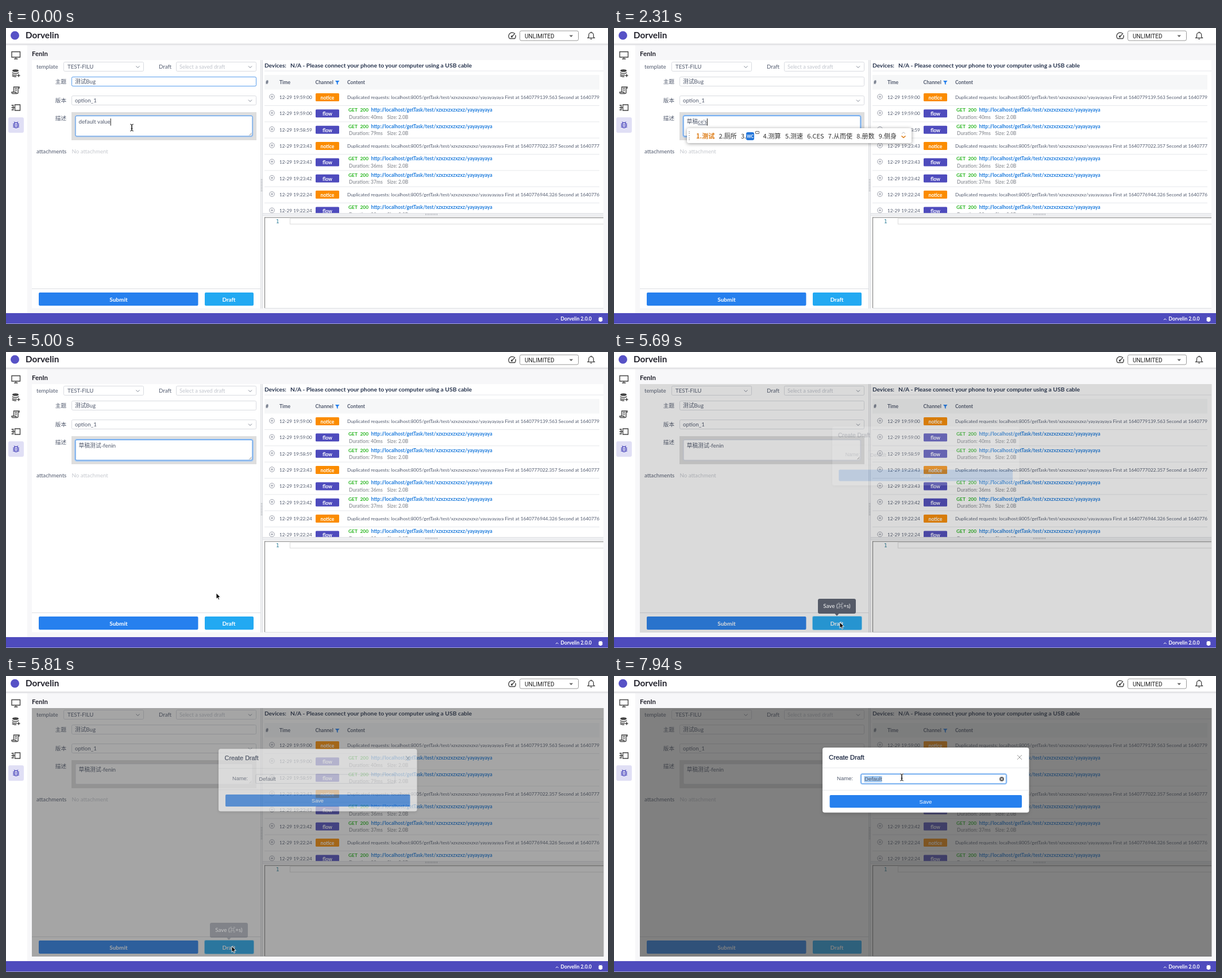
Animation of 1048 by 517 pixels, one loop 8000 ms. Source, as an HTML page:

```html
<!DOCTYPE html>
<html lang="zh">
<head>
<meta charset="utf-8">
<title>Create draft</title>
<style>
  html, body { margin: 0; width: 100%; height: 100%; overflow: hidden; background: #f7f7f9; }
  svg { position: absolute; left: 0; top: 0; display: block; }
  svg text { font-family: Lato, "Noto Sans CJK SC", "Noto Sans CJK", "DejaVu Sans", sans-serif; white-space: pre; }
  svg text.ui { font-family: "Liberation Sans", Arial, sans-serif; }
  svg text.rb { font-family: Roboto, sans-serif; }
  #comp { text-decoration: underline; }
  #ime {
    position: absolute; top: 175px; height: 26px; width: 391px; box-sizing: border-box;
    padding-left: 16px; display: flex; align-items: center; gap: 7.3px; white-space: nowrap;
    background: #fff; border-radius: 3px; box-shadow: 0 1px 6px rgba(0,0,0,.4);
    font: 500 11px "Noto Sans CJK SC", "Noto Sans CJK", sans-serif; color: #333;
  }
  #ime .first { color: #dd7a12; font-weight: 700; }
  #ime .grip { position: absolute; left: 3px; top: 5px; bottom: 5px; border-left: 2px dotted #ccc; }
  #ime .wc { display: inline-block; width: 14px; height: 14px; margin-right: 8px; border-radius: 3px;
    background: #2476da; color: #fff; font: 700 7px/14px Lato, sans-serif; text-align: center; vertical-align: 1px; position: relative; }
  #ime .wc::after { content: ""; position: absolute; left: 16px; top: -2px; width: 5px; height: 3px; border: 1px solid #666; border-radius: 1px; }
  #ime svg { left: 371px; top: 5px; }
</style>
</head>
<body>
<svg id="stage" width="1048" height="517" viewBox="0 0 1048 517"></svg>
<div id="ime"></div>
<script>
const LOOP = 8000, STEP = 62.5;
const VIOLET = '#4e4bbd', BLUE = '#2680ee', INK = '#515a6e', DARK = '#26334d';

// Markup helpers; text is centred vertically on y.
const text = (x, y, size, str, fill = INK, extra = '') =>
  `<text x="${x}" y="${y + size * .35}" font-size="${size}" fill="${fill}" ${extra}>${str}</text>`;
const rect = (x, y, w, h, fill, extra = '') =>
  `<rect x="${x}" y="${y}" width="${w}" height="${h}" fill="${fill}" ${extra}/>`;
const path = (d, stroke, width = 1, extra = '') =>
  `<path d="${d}" fill="none" stroke="${stroke}" stroke-width="${width}" ${extra}/>`;
const box = (x, y, w, h, extra = '') => rect(x, y, w, h, '#fff', `rx="2" stroke="#d9dbe0" ${extra}`);
const chevron = (x, y) => path(`M${x - 3} ${y - 1.5}l3 3l3 -3`, '#7b8290');
const BOLD = ' font-weight="700"', MID = 'text-anchor="middle"', END = 'text-anchor="end"';

function bug(x, y, s, color) {
  return `<g transform="translate(${x} ${y}) scale(${s})">` +
    path('M-3 -1.5a3 3 0 0 1 6 0v3.5a3 3 0 0 1 -6 0zM-2 -4l-1.5 -1.8M2 -4l1.5 -1.8' +
      'M-3 -2h-2.6M3 -2h2.6M-3 .8h-2.6M3 .8h2.6M-3 3.4h-2.6M3 3.4h2.6M-1.2 -.8h2.4M-1.2 1.8h2.4', color, 1.3) + '</g>';
}

function header() {
  return rect(0, 0, 1048, 28, '#fff') +
    ['#d0d0d4', '#dedee1', '#ededf0'].map((c, i) => rect(0, 27.5 + i, 1048, 1, c)).join('') +
    '<circle cx="15.5" cy="13" r="7.5" fill="#5752c6"/>' +
    text(34, 12.5, 15.3, 'Dorvelin', '#22222c', BOLD) +
    path('M876.5 18.5a6 6 0 1 1 9.6 -8.2M887 12.5a6 6 0 0 1 -1.4 6h-9M880 15.5l5.8 -5.5', '#444', 1.4) +
    '<circle cx="880.5" cy="15" r="1.7" fill="#444"/>' +
    rect(894.5, 5, 102, 17, '#fff', 'rx="2.5" stroke="#999"') +
    text(903, 14, 10.1, 'UNLIMITED', '#222', 'class="rb"') +
    '<path d="M980.5 12.5h6.6l-3.3 3.6z" fill="#666"/>' +
    path('M1012.8 17.3h11.6l-1.7 -2v-3.2a4.1 4.1 0 0 0 -8.2 0v3.2zM1017.2 19.4h2.8M1018.6 8v-1.5', '#444', 1.3);
}

function sidebar() {
  const c = '#444';
  return rect(0, 30.5, 37, 467.5, '#fff') + rect(4, 156, 27, 27, '#e0dff5', 'rx="3"') +
    path('M10 41.5h14.5v9.5h-14.5zM14 54h6.5M17.2 51v3', c, 1.4) +
    '<ellipse cx="16.5" cy="74.5" rx="5.5" ry="2.3" fill="#444"/>' +
    path('M11 77.5c1 2.6 10 2.6 11 0M11 80.5c.8 2.3 6 2.4 8 1.6M11 83c.8 2 5 2.2 7 1.8M19.5 83h5M22 80.5v5', c, 1.5) +
    path('M13.5 112v-9h9.5v2h-2v7.5a2 2 0 0 1 -2 2h-7.5a2 2 0 0 1 -1.5 -2.5h7.5v1.8M15.5 105.5h3.5M15.5 108.5h3.5', c, 1.4) +
    path('M15.5 134h9v10h-9zM12.5 134v10M9.5 135h3M9.5 139h6M9.5 143h3', c, 1.4) +
    bug(17.5, 169.5, .98, VIOLET);
}

function form() {
  const field = (x, y, str, fill) => text(x, y, 9.7, str, fill);
  return rect(45, 56, 398, 433.5, '#fff') +
    field(53, 68, 'template') + box(100.5, 59.5, 139, 16) + field(107, 68, 'TEST-FILU') + chevron(229.5, 68) +
    field(266, 68, 'Draft') + box(296.5, 59.5, 139, 16) + text(302, 68, 9.3, 'Select a saved draft', '#c0c4cc') + chevron(425, 68) +
    text(105, 94, 9.6, '主题', INK, END) + box(114.5, 85.5, 321, 16) + field(120, 94, '测试Bug') +
    '<rect id="subject" x="114.5" y="85.5" width="321" height="16" rx="2" fill="none" stroke="#5a9fee"/>' +
    text(105, 126.5, 9.6, '版本', INK, END) + box(114.5, 118.5, 321, 16) + field(120, 127, 'option_1') + chevron(425, 127) +
    text(105, 158, 9.6, '描述', INK, END) + rect(114, 147, 322, 49, '#dedede') +
    '<rect id="glow" x="120.5" y="153" width="309" height="37" rx="3" fill="none" stroke="#a9cbf4" stroke-width="3"/>' +
    box(121, 153.5, 308, 35.5) +
    '<rect id="areaEdge" x="121" y="153.5" width="308" height="35.5" rx="2" fill="none" stroke="#4492ec"/>' +
    path('M423.5 187.5l4 -4M426 187.5l1.5 -1.5', '#777', .8) +
    '<rect id="areaSel" x="126" y="157" height="14" fill="#a2c8ef"/>' +
    '<text id="area" x="126.5" y="167.4" font-size="9.8" fill="#515a6e"><tspan id="done"></tspan><tspan id="comp"></tspan></text>' +
    '<rect id="areaCaret" y="158" width="1" height="12.5" fill="#222"/>' +
    field(53, 216, 'attachments') + field(114.5, 216, 'No attachment', '#c5c8ce') +
    rect(45, 455, 398, 1, '#dcdee2') +
    rect(57, 462, 277.5, 23, BLUE, 'rx="2"') + text(196, 474, 10, 'Submit', '#fff', MID + BOLD) +
    '<rect id="draftRing" x="345" y="461" width="87" height="25" rx="3" fill="#9bdcfa"/>' +
    rect(346, 462, 85, 23, '#22a9f2', 'rx="2"') + text(388, 474, 10, 'Draft', '#fff', MID + BOLD);
}

function row(y, [time, info]) {
  const notice = info.includes('.');
  const head = rect(450, y + 14, 583, 1, '#e6e8ec') +
    `<circle cx="463" cy="${y - 1}" r="4.3" fill="none" stroke="#808695" stroke-width=".8"/>` +
    path(`M460.8 ${y - 1}h4.4M463 ${y - 3.2}v4.4`, '#808695', .8) +
    text(476, y, 8.2, '12-29 ' + time) +
    rect(539, y - 7, 41, 14, notice ? '#fb8c00' : VIOLET, 'rx="1.5"') +
    text(559.5, y + .8, 8.6, notice ? 'notice' : 'flow', '#fff', MID + BOLD);
  const route = '/getTask/test/xzxzxzxzxzxz/yayayayaya';
  if (notice) {
    return head + text(594, y, 8.24, `Duplicated requests: localhost:8005${route} First at ${info} Second at ${info.slice(0, 7)}`);
  }
  return head + text(596, y - 6, 8.4, 'GET', '#25b51d', BOLD) + text(616.5, y - 6, 8.4, '200', '#25b51d', BOLD) +
    text(635.5, y - 6, 8.6, 'http://localhost' + route, '#1f7ddd', BOLD) +
    text(597, y + 6.5, 8.5, `Duration: ${info}ms`, '#9a9da3', BOLD) + text(663.5, y + 6.5, 8.5, 'Size: 2.0B', '#9a9da3', BOLD);
}

function table() {
  const rows = [
    ['19:59:00', '1640779139.563'], ['19:59:00', '40'], ['19:58:59', '79'], ['19:23:43', '1640777022.357'],
    ['19:23:43', '36'], ['19:23:42', '37'], ['19:22:24', '1640776944.326'], ['19:22:24', '38']];
  const head = (x, s) => text(x, 95, 8.6, s, INK, BOLD);
  return rect(447, 56, 593, 268, '#fff') +
    text(450, 65.5, 10.1, 'Devices:', DARK, BOLD) + text(495, 65.5, 10.3, 'N/A - Please connect your phone to your computer using a USB cable', DARK, BOLD) +
    rect(450, 74.5, 590, 1, '#e6e8ec') + rect(450, 82, 583, 25.5, '#f6f7f8') +
    head(452, '#') + head(476, 'Time') + head(538.5, 'Channel') + head(594, 'Content') +
    '<path d="M573 92h7.5l-2.8 3.4v3.6l-1.9 -1v-2.6z" fill="#2680ee"/>' +
    `<g clip-path="url(#tableClip)">${rows.map((r, i) => row(121 + i * 28.35, r)).join('')}</g>`;
}

function panes() {
  const grip = (x, y, w, h) => path(h > w ? `M${x} ${y}v${h}` : `M${x} ${y}h${w}`, '#b5b8bd', 3, 'stroke-dasharray="1 1.5"');
  return rect(443, 56, 4, 434, '#f1f2f4') + rect(443, 56, 1, 434, '#dcdee2') + rect(446, 56, 1, 434, '#dcdee2') + grip(445, 264, 0, 21) +
    rect(447, 323.5, 593, 5, '#f1f2f4') + rect(447, 323.5, 593, 1, '#dcdee2') + rect(447, 327.5, 593, 1, '#dcdee2') + grip(730, 325.5, 21, 0) +
    rect(447, 328.5, 593, 161, '#fff') + rect(450, 330.5, 590, 1, '#777') + rect(450, 330.5, 1, 159, '#777') +
    rect(450, 489, 590, 1, '#dcdee2') + rect(494.5, 332.5, 548, 10, 'none', 'stroke="#e4e4e4" stroke-width="1.4" clip-path="url(#paneClip)"') +
    text(475.5, 337.5, 9, '1', '#237893', `${END} style="font-family:'DejaVu Sans Mono',monospace"`);
}

function footer() {
  return rect(0, 498, 1048, 19, VIOLET) + rect(0, 516, 1048, 1, '#a3a2d2') +
    path('M957 510l2.3 -2.3l2.3 2.3', '#fff') +
    text(965.5, 508, 8.6, 'Dorvelin 2.0.0', '#fff', BOLD) +
    '<rect x="1032" y="505" width="6" height="8" rx="3" fill="#fff"/>' + bug(1035, 508.5, .68, '#fff');
}

function modal() {
  return '<g id="modal">' + rect(363, 125, 359.5, 113.5, '#fff', 'rx="4" filter="url(#soft)"') +
    text(374, 142, 11.3, 'Create Draft', '#17233d', 'class="ui" stroke="#17233d" stroke-width=".25"') +
    path('M702 138l8 8M710 138l-8 8', '#999') +
    rect(363, 160, 359.5, 1, '#e8eaec') + rect(363, 199, 359.5, 1, '#e8eaec') +
    text(388, 179, 9.6, 'Name:', INK, 'class="ui"') +
    '<rect id="nameGlow" x="429.5" y="171" width="254" height="17.5" rx="3" fill="none" stroke="#b5d3f6" stroke-width="2.4"/>' +
    box(430.3, 171.5, 252.4, 16.4, 'id="nameBox"') +
    '<rect id="nameSel" x="435.5" y="174.5" width="31" height="11" fill="#a2c8ef"/>' +
    text(436, 180, 9.7, 'Default', INK, 'class="ui"') +
    '<rect id="nameCaret" x="467" y="174.5" width="1" height="11" fill="#222"/>' +
    '<g id="clear"><circle cx="675" cy="180" r="4" fill="#666"/>' + path('M673.4 178.4l3.2 3.2M676.6 178.4l-3.2 3.2', '#fff', .9) + '</g>' +
    rect(375.5, 208, 334.5, 22, BLUE, 'id="save" rx="2"') + text(542.5, 219.5, 9.6, 'Save', '#fff', MID + ' class="ui"') + '</g>';
}

function cursors() {
  const beam = 'M-2.8 -6q2.8 0 2.8 2v8q0 2 -2.8 2M2.8 -6q-2.8 0 -2.8 2v8q0 2 2.8 2M-1.4 1.6h2.8';
  const edge = 'stroke="#fff" stroke-width=".9"';
  return '<g id="cursor">' +
    `<g id="beam">${path(beam, '#fff', 2.2)}${path(beam, '#111', 1)}</g>` +
    `<path id="arrow" d="M0 0v10.3l2.3 -2.1l1.6 3.6l1.7 -.8l-1.6 -3.4h3.3z" fill="#000" ${edge}/>` +
    `<path id="hand" d="M-1 0q1.4 -1 2 .4v3.2q1.4 -.6 2 .4q1.3 -.6 1.9 .4q1.6 -.4 1.7 1l-.8 4.6v1.2h-4.8v-1.2l-3.6 -4q.4 -1.4 1.6 -.6z" fill="#fff" stroke="#111" stroke-width=".9"/></g>`;
}

document.getElementById('stage').innerHTML =
  '<defs><clipPath id="tableClip"><rect x="450" y="107" width="583.5" height="216.5"/></clipPath>' +
  '<clipPath id="paneClip"><rect x="447" y="328" width="593" height="162"/></clipPath>' +
  '<filter id="soft"><feDropShadow dx="0" dy="2" stdDeviation="3" flood-opacity=".18"/></filter></defs>' +
  rect(0, 0, 1048, 517, '#f7f7f9') + header() + sidebar() + text(45, 45.5, 11.3, 'FenIn', '#22222c', BOLD) +
  form() + table() + panes() + footer() +
  rect(45, 56, 995.5, 434, '#373737', 'id="mask"') +
  '<g id="tip"><path d="M358 431h60a3 3 0 0 1 3 3v20a3 3 0 0 1 -3 3h-26.500l-3.500 4l-3.500 -4h-26.500a3 3 0 0 1 -3 -3v-20a3 3 0 0 1 3 -3z" fill="#464c5b"/>' +
  text(388, 444, 9.8, 'Save (⌘+s)', '#fff', MID) + '</g>' + modal() + cursors();

const el = {};
document.querySelectorAll('[id]').forEach(n => el[n.id] = n);
const show = (n, on) => n.style.display = on ? '' : 'none';
const clamp = v => Math.min(1, Math.max(0, v));
const ramp = (t, from, to) => clamp((t - from) / (to - from));
const latest = (table, t) => table.filter(k => k[0] <= t).pop();

// time, committed text, text still being composed
const typing = [
  [0, 'default value', ''], [1250, '', 'c'], [1375, '', 'ca'], [1437, '', 'cao'], [1562, '', "cao'g"],
  [1687, '', "cao'ga"], [1750, '', "cao'gao"], [1937, '草稿', ''], [2062, '草稿', 'c'], [2187, '草稿', 'ce'],
  [2300, '草稿', "ce's"], [2437, '草稿', "ce'sh"], [2500, '草稿', "ce'shi"], [2750, '草稿测试', ''],
  [2937, '草稿测试-', ''], [3062, '草稿测试-f', ''], [3125, '草稿测试-fe', ''], [3250, '草稿测试-fen', ''],
  [3312, '草稿测试-feni', ''], [3400, '草稿测试-fenin', '']];

const choices = {
  c: '才 从 次 层 草 错 曾 测 此', ca: '擦 嚓 才 菜 参 藏 草 策 惨', cao: '草 操 曹 槽 糙 嘈 漕 艹 螬',
  "cao'g": '草稿 草根 草果 草菇 操过 草冠 操工', "cao'gao": '草稿 草高 曹高 草 操 曹 槽 糙',
  ce: '测 册 侧 策 厕 恻 侧面 测试 策略', "ce's": '测试 厕所 WC 测算 测速 CES 从而使 册数 侧身',
  "ce'shi": '测试 侧视 测时 策士 侧室 测 册 侧'};
choices["cao'ga"] = choices["cao'gao"];
choices["ce'sh"] = choices["ce'shi"];

// time, x, y, shape
const moves = [
  [0, 219, 174, 'beam'], [1250, 219, 174, ''], [4375, 219, 174, 'beam'], [4500, 240, 215, 'arrow'],
  [4800, 340, 395, 'arrow'], [5000, 366, 421, 'arrow'], [5250, 393, 472, 'hand'], [5600, 393, 472, 'arrow'],
  [5850, 393, 472, 'arrow'], [6062, 470, 300, 'arrow'], [6150, 492, 230, 'hand'], [6250, 499.5, 220, 'hand'],
  [6650, 499.5, 220, 'hand'], [6812, 501, 190, 'beam'], [6937, 501, 177, 'beam'], [8000, 501, 177, 'beam']];

let shownList = '';
function drawIme(composing, left) {
  show(el.ime, composing);
  if (!composing) return;
  el.ime.style.left = left - 19 + 'px';
  if (shownList === composing) return;
  shownList = composing;
  el.ime.innerHTML = '<i class="grip"></i>' + choices[composing].split(' ').map((c, i) =>
    `<span class="${i ? '' : 'first'}">${i + 1}.${c === 'WC' ? '<b class="wc">WC</b>' : c}</span>`).join('') +
    `<svg width="12" height="16">${path('M3 4.500l3 -2.500l3 2.500', '#bbb')}${path('M2.500 8.500l3.500 3l3.500 -3', '#dd7a12', 1.6)}</svg>`;
}

function drawArea(t) {
  const [since, done, comp] = latest(typing, t);
  const selected = t >= 750 && t < 1250;
  el.done.textContent = done;
  el.comp.textContent = '';
  const start = 126.5 + el.area.getComputedTextLength();
  el.comp.textContent = comp;
  const end = 126.5 + el.area.getComputedTextLength();
  show(el.areaSel, selected);
  el.areaSel.setAttribute('width', end - 126);
  el.areaCaret.setAttribute('x', end);
  show(el.areaCaret, !selected && t < 5560 && (t - since) % 1000 < 500);
  drawIme(comp, start);
  const focus = 1 - ramp(t, 5500, 5700);
  el.areaEdge.style.opacity = focus;
  el.glow.style.opacity = focus * (.3 + .7 * ramp(t, 0, 200));
  el.subject.style.opacity = 1 - ramp(t, 0, 200);
}

function drawModal(t) {
  const p = ramp(t, 5600, 5900), s = .866 + .134 * p;
  el.mask.style.opacity = .63 * p;
  show(el.modal, p > 0);
  el.modal.style.opacity = p ** 1.5;
  el.modal.setAttribute('transform', `translate(542.5 181.5) scale(${s}) translate(-542.5 -181.5)`);
  el.tip.style.opacity = .9 * ramp(t, 5250, 5400) * (1 - ramp(t, 5687, 5900));
  const focused = t >= 7187, selected = t >= 7500;
  show(el.draftRing, t >= 5560 && !focused);
  show(el.nameGlow, focused);
  el.nameBox.setAttribute('stroke', t >= 6800 ? '#4492ec' : '#d9dbe0');
  show(el.nameSel, selected);
  show(el.nameCaret, focused && !selected);
  show(el.clear, t >= 6800);
  el.save.setAttribute('fill', t >= 6125 && t < 6780 ? '#3489ee' : BLUE);
}

function drawCursor(t) {
  const a = latest(moves, t), b = moves[moves.indexOf(a) + 1] || a;
  const p = b === a ? 0 : ramp(t, a[0], b[0]);
  el.cursor.setAttribute('transform', `translate(${a[1] + (b[1] - a[1]) * p} ${a[2] + (b[2] - a[2]) * p})`);
  for (const shape of ['beam', 'arrow', 'hand']) show(el[shape], a[3] === shape);
}

function draw(now) {
  const t = Math.floor((now % LOOP + 3) / STEP) * STEP % LOOP;
  drawArea(t);
  drawModal(t);
  drawCursor(t);
}

const begin = performance.now();
function tick() {
  draw(performance.now() - begin);
  requestAnimationFrame(tick);
}
tick();
</script>
</body>
</html>
```
